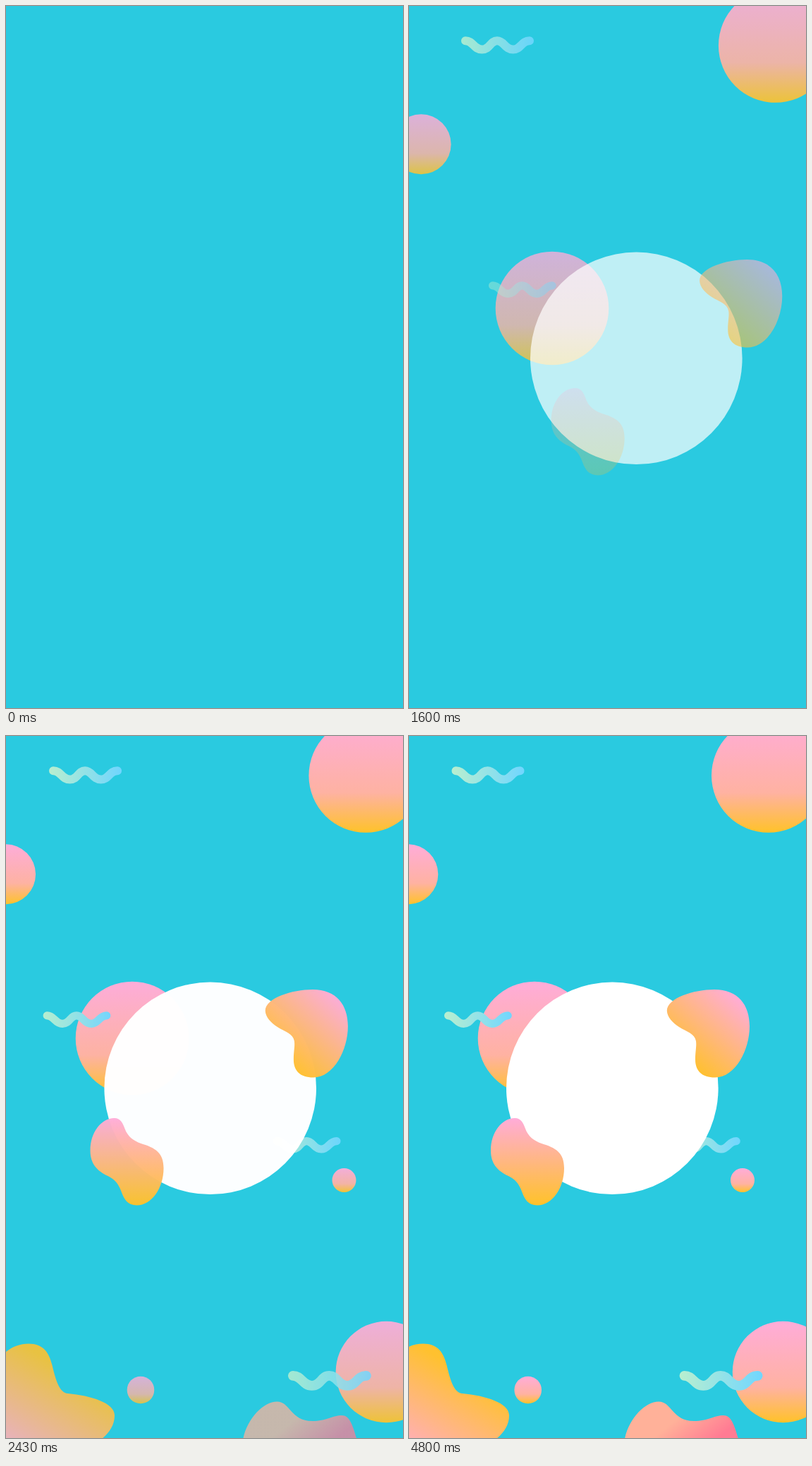
Animation of 563 by 994 pixels, one loop 6.03 s. Source, as an HTML page:

```html
<!DOCTYPE html>
<html lang="en">
<head>
<meta charset="utf-8">
<title>Floating shapes</title>
<style>
  html, body { margin: 0; width: 100%; height: 100%; overflow: hidden; background: #2acae0; }
  svg { display: block; width: 563px; height: 994px; }
</style>
</head>
<body>
<svg viewBox="0 0 563 994">
  <defs>
    <linearGradient id="sunset" x2="0" y2="1">
      <stop stop-color="#ffacd9"/>
      <stop offset=".65" stop-color="#ffb2a2"/>
      <stop offset="1" stop-color="#ffc229"/>
    </linearGradient>
    <linearGradient id="fade" x2="0" y2="1">
      <stop stop-color="#ffacd9"/>
      <stop offset="1" stop-color="#ffc229"/>
    </linearGradient>
    <linearGradient id="rise" x1=".3" y1=".85" x2=".9" y2=".1">
      <stop stop-color="#ffc032"/>
      <stop offset="1" stop-color="#ffacd9"/>
    </linearGradient>
    <linearGradient id="corner" gradientUnits="userSpaceOnUse" x1="60" y1="890" x2="-15" y2="1020">
      <stop stop-color="#ffc12f"/>
      <stop offset="1" stop-color="#ffacd0"/>
    </linearGradient>
    <linearGradient id="coral" gradientUnits="userSpaceOnUse" x1="395" y1="955" x2="431" y2="1000">
      <stop stop-color="#ffb199"/>
      <stop offset="1" stop-color="#ff7b93"/>
    </linearGradient>
    <linearGradient id="mint" gradientUnits="userSpaceOnUse" x1="0" y1="0" x2="103" y2="0">
      <stop stop-color="#b9efcf"/>
      <stop offset="1" stop-color="#70d6ff"/>
    </linearGradient>
    <path id="wave" fill="none" stroke="url(#mint)" stroke-width="12" stroke-linecap="round"
      d="M6 6C17 6 18 18.300 29.500 18.300S41 6 51 6S62 18.300 73.500 18.300S85 6 97 6"/>
  </defs>
</svg>
<script>
const LOOP = 6030, FIRST = 970, STAGGER = 80, DURATION = 1800, SHIFT = 112.6;

const circle = (x, y, r, fill = 'url(#sunset)') => `<circle cx="${x}" cy="${y}" r="${r}" fill="${fill}"/>`;
const wave = (x, y, scale) => `<use href="#wave" transform="translate(${x} ${y}) scale(${scale})"/>`;
const blob = (fill, d) => `<path fill="url(#${fill})" d="${d}"/>`;

// [entrance order, markup], listed from back to front
const shapes = [
  [0, circle(509.8, 56, 80.8)],
  [1, wave(60.5, 43.3, 1)],
  [2, circle(-1.2, 195.7, 42.5)],
  [3, circle(178, 428, 80.3)],
  [8, wave(374, 568, .93)],
  [4, circle(288.3, 498.8, 150.3, '#fff')],
  [5, blob('rise', 'M365.800 389C366 371 404 359 433 359C467 359 483 381 483 411C483 444 463 483.500 434 483.500C415 483.500 406 474 406 458C406 446 408 440 407 432C405 421 394 419 383 412C374 406 366 398 365.800 389Z')],
  [6, wave(50, 390.3, .93)],
  [7, blob('fade', 'M150 541C159 541 162 548 165 556C169 567 177 573 188 577C208 583 220 590 220 612C220 640 203 664.500 182 664.500C169 664.500 164 656 160 645C156 634 151 628 141 623C126 616 116 606 116 587C116 561 132 541 150 541Z')],
  [9, circle(473, 629, 17)],
  [10, circle(530.5, 900.5, 71.7)],
  [11, blob('corner', 'M20 860.500C41 860.500 49 873 53.500 891C59 914 64 930 76 931C108 934 142 944 142 962C142 976 134 987 124 995C95 1019 45 1035 10 1030C-22 1026 -39 978 -39 940C-39 892 -13 860.500 20 860.500Z')],
  [12, wave(383.6, 898.9, 1.145)],
  [13, circle(168.7, 926, 19.3)],
  [14, blob('coral', 'M306 995C312 966 335 942.500 354 942.500C373 942.500 373 970 404 970C424 970 433 962 446 962C457 962 461 975 467 995Z')]
];

const svg = document.querySelector('svg');
const items = shapes.map(([order, markup]) => {
  const node = document.createElementNS('http://www.w3.org/2000/svg', 'g');
  node.innerHTML = markup;
  svg.append(node);
  return { node, start: FIRST + order * STAGGER };
});

const expoOut = p => p >= 1 ? 1 : 1 - 2 ** (-10 * p);

function draw(now) {
  const time = now % LOOP;
  for (const { node, start } of items) {
    const shown = time < 1000 ? 0 : expoOut(Math.max(0, (time - start) / DURATION));
    node.setAttribute('transform', `translate(${SHIFT * (1 - shown)} 0)`);
    node.setAttribute('opacity', shown);
  }
}

const origin = performance.now();
function tick() {
  draw(performance.now() - origin);
  requestAnimationFrame(tick);
}
tick();
</script>
</body>
</html>
```
